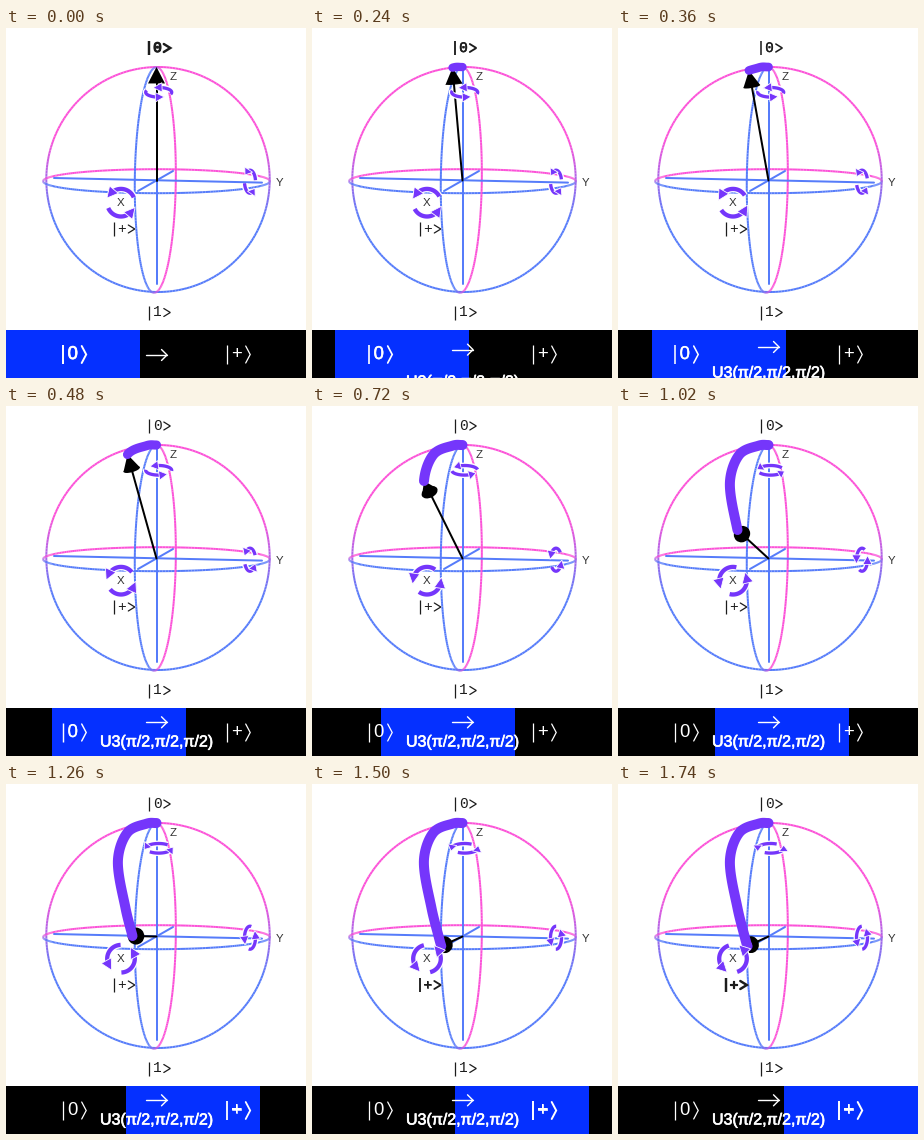
Animation, 300 px wide and 350 px high, one loop 3540 ms. Source, as a matplotlib script:

```python
import numpy as np
import matplotlib.pyplot as plt
import matplotlib.patheffects as pe
from matplotlib.animation import FuncAnimation
from matplotlib.collections import LineCollection
from matplotlib.patches import Ellipse, Polygon, Rectangle

W, H, DPI = 300, 350, 100
PX = 72 / DPI
STEP, MOVE, FRAMES = 60, 1740, 59
PURPLE = "#7536fb"
BAR_BLUE = "#0530ff"
PINK = np.array([252, 82, 216]) / 255
BLUE = np.array([86, 124, 250]) / 255
CENTER = np.array([150.5, 152.5])
RADIUS = 113.5
BAR_TOP = 302

fig = plt.figure(figsize=(W / DPI, H / DPI), dpi=DPI, facecolor="white")
ax = fig.add_axes([0, 0, 1, 1])
ax.set_xlim(0, W)
ax.set_ylim(H, 0)
ax.axis("off")


def line(xs, ys, color, width, z, **kw):
    kw.setdefault("solid_capstyle", "round")
    return ax.plot(xs, ys, color=color, lw=width * PX, zorder=z, **kw)[0]


def text(x, y, s, size, color, z, font="Liberation Sans"):
    return ax.text(x, y, s, fontsize=size * PX, color=color, zorder=z,
                   family=font, ha="center", va="center")


def shaded_ellipse(cx, cy, rx, ry, toward, soft, lean=0):
    """Outline that fades from blue to pink along the 'toward' direction."""
    a = np.linspace(0, 2 * np.pi, 241)
    unit = np.column_stack([np.cos(a), np.sin(a)])
    pts = unit * [rx, ry] + [cx, cy]
    pts[:, 0] -= lean * unit[:, 1]
    mix = np.clip(0.5 + unit[:-1] @ np.array(toward) / soft, 0, 1)[:, None]
    segs = np.stack([pts[:-1], pts[1:]], axis=1)
    ax.add_collection(LineCollection(segs, colors=BLUE + (PINK - BLUE) * mix,
                                     linewidths=2 * PX, zorder=2,
                                     capstyle="butt"))


class Ket:
    """Bar, symbol and angle bracket with an adjustable weight."""

    def __init__(self, x, y, char, size, color, tall, arm, offsets, font,
                 z=9):
        mid, left = offsets
        self.color = color
        self.base = 1.25
        self.lines = [
            line([x, x], [y - tall, y + tall], color, 1, z,
                 solid_capstyle="butt"),
            line([x + left, x + left + arm[0], x + left],
                 [y - arm[1], y, y + arm[1]], color, 1, z,
                 solid_joinstyle="miter"),
        ]
        self.glyph = text(x + mid, y, char, size, color, z, font)

    def weigh(self, extra):
        for ln in self.lines:
            ln.set_linewidth((self.base + extra) * PX)
        stroke = pe.withStroke(linewidth=extra * PX, foreground=self.color)
        self.glyph.set_path_effects([stroke] if extra > 0 else [])


def sphere_ket(x, y, char):
    return Ket(x, y, char, 14.5, "#1c1c1c", 7, (6.5, 4), (8.5, 14.8),
               "Liberation Mono")


def bar_ket(x, char):
    return Ket(x, 326.5, char, 18.5, "white", 9.5, (4.5, 8.5), (9.8, 18.7),
               "Liberation Sans")


class Ring:
    """Two curved arrows chasing each other around an ellipse."""

    def __init__(self, x, y, rx, ry, width, start, head):
        self.c, self.r = np.array([x, y]), np.array([rx, ry])
        self.start, self.head = start, head
        self.halos = [line([], [], "white", width + 2.5, 6,
                           solid_capstyle="butt") for _ in range(2)]
        self.arcs = [line([], [], PURPLE, width, 6.2,
                          solid_capstyle="butt") for _ in range(2)]
        self.heads = [ax.add_patch(Polygon(np.zeros((3, 2)), fc=PURPLE,
                                           ec="white", lw=0.8 * PX,
                                           zorder=6.4)) for _ in range(2)]

    def at(self, a):
        return self.c + self.r * np.column_stack([np.cos(a), -np.sin(a)])

    def turn(self, p):
        for i in range(2):
            end = np.radians(self.start + 85 * p + 180 * i)
            pts = self.at(np.linspace(end - 2.05, end, 30))
            self.halos[i].set_data(pts.T)
            self.arcs[i].set_data(pts.T)
            tan = self.r * [-np.sin(end), -np.cos(end)]
            speed = np.hypot(*tan)
            tan = tan / speed
            side = np.array([-tan[1], tan[0]])
            long = max(6.5, self.head * speed / self.r.max())
            half = self.head * 0.52
            tip, back = pts[-1] + tan * long * 0.5, pts[-1] - tan * long * 0.5
            self.heads[i].set_xy([tip, back + side * half, back - side * half])


# sphere and axes
shaded_ellipse(152, 151.5, 111.7, 112.5, (0, -1), 0.7)
shaded_ellipse(150.5, 153.2, 113.5, 12, (0, -1), 0.5)
shaded_ellipse(149.3, 152, 20.5, 112.8, (1, 0), 0.5, lean=1.2)
line([150.5, 150.5], [42, 256], BLUE, 2, 2)
line([48, 256], [150, 154.6], BLUE, 2, 2)
line([132, 167], [163, 143], BLUE, 2, 2)
for x, y, s in [(166.7, 49, "Z"), (273.5, 154.5, "Y"), (114.5, 175, "X")]:
    text(x, y, s, 11.5, "#333333", 8)

zero = sphere_ket(143, 20, "0")
one = sphere_ket(143, 284.5, "1")
plus = sphere_ket(107.5, 201, "+")

# state vector
shaft = line([], [], "black", 2, 3)
cone = ax.add_patch(Polygon(np.zeros((3, 2)), fc="black", lw=0, zorder=3.2))
disc = ax.add_patch(Ellipse((0, 0), 1, 1, fc="black", lw=0, zorder=3.2))
trail = line([], [], PURPLE, 9.8, 4, solid_joinstyle="round")
rings = [Ring(152.7, 64.3, 13, 4.8, 3.3, 275, 9),
         Ring(244, 153.7, 5.5, 11.5, 3.3, 125, 9),
         Ring(115, 174.7, 13.8, 13.8, 4.3, 140, 11)]

# bottom bar
ax.add_patch(Rectangle((0, BAR_TOP), W, H - BAR_TOP, fc="black", lw=0,
                       zorder=7))
slider = ax.add_patch(Rectangle((0, BAR_TOP), 134, H - BAR_TOP, fc=BAR_BLUE,
                                lw=0, zorder=7.5))
bar_zero = bar_ket(57, "0")
bar_plus = bar_ket(221, "+")
arrow_body = line([], [], "white", 1.4, 9)
arrow_head = line([], [], "white", 1.4, 9)
gate = ax.text(94, 340, "U3(π/2,π/2,π/2)", fontsize=16 * PX, color="white",
               family="Liberation Sans", ha="left", va="baseline", zorder=9)
gate.set_path_effects([pe.withStroke(linewidth=0.6 * PX, foreground="white")])

# tip of the vector: time, x, y
KEYS = np.array([[0, 150.5, 39], [240, 140.5, 39.7], [480, 121.5, 48.5],
                 [720, 112, 75], [1020, 119.5, 124], [1260, 126.5, 152],
                 [1740, 129.5, 162]])
TIMES, SPOTS = KEYS[:, 0], KEYS[:, 1:]
SLOPES = np.gradient(SPOTS, TIMES, axis=0)
SLOPES[-1] = 0


def tip_at(t):
    t = np.atleast_1d(t)
    i = np.clip(np.searchsorted(TIMES, t, side="right") - 1, 0, len(TIMES) - 2)
    span = (TIMES[i + 1] - TIMES[i])[:, None]
    u = (t - TIMES[i])[:, None] / span
    return ((1 + 2 * u) * (1 - u) ** 2 * SPOTS[i]
            + u * (1 - u) ** 2 * span * SLOPES[i]
            + u ** 2 * (3 - 2 * u) * SPOTS[i + 1]
            + u ** 2 * (u - 1) * span * SLOPES[i + 1])


def draw_vector(t):
    tip = tip_at(t)[0]
    reach = CENTER - tip
    length = np.hypot(*reach)
    base = tip + reach * 0.145
    depth = np.sqrt(max(0, 1 - (length / RADIUS) ** 2))
    side = np.array([-reach[1], reach[0]]) / length * 8.5
    shaft.set_data(*zip(CENTER, base))
    cone.set_xy([tip, base + side, base - side])
    disc.set_center(base)
    disc.set_width(17)
    disc.set_height(17 * depth)
    disc.set_angle(np.degrees(np.arctan2(side[1], side[0])))
    path = tip_at(np.linspace(0, t, 90))
    trail.set_data(path.T)
    trail.set_linewidth(np.interp(t, [0, 240, 720], [7, 8.3, 10]) * PX)
    trail.set_visible(t > 0)


def update(k):
    t = min(k * STEP, MOVE)
    p = t / MOVE
    draw_vector(t)
    for ring in rings:
        ring.turn(p * p * (3 - 2 * p))

    slider.set_x(round(166 * p))
    rise = min(t / 480, 1)
    y = 327 - 10.7 * rise
    arrow_body.set_data([140, 161], [y, y])
    arrow_head.set_data([155.5, 161, 155.5], [y - 5.5, y, y + 5.5])
    gate.set_y(376.5 - 36 * rise)

    zero.weigh(1.2 * (1 - rise))
    one.weigh(0)
    plus.weigh(1.2 * np.clip((t - 1260) / 480, 0, 1))
    bar_zero.weigh(0.7 * np.clip(1 - t / 660, 0, 1))
    bar_plus.weigh(0.7 * np.clip((t - 1020) / 300, 0, 1))
    return []


anim = FuncAnimation(fig, update, frames=FRAMES, interval=STEP,
                     init_func=lambda: update(0), repeat=True,
                     repeat_delay=0, blit=False)
plt.show()
```
